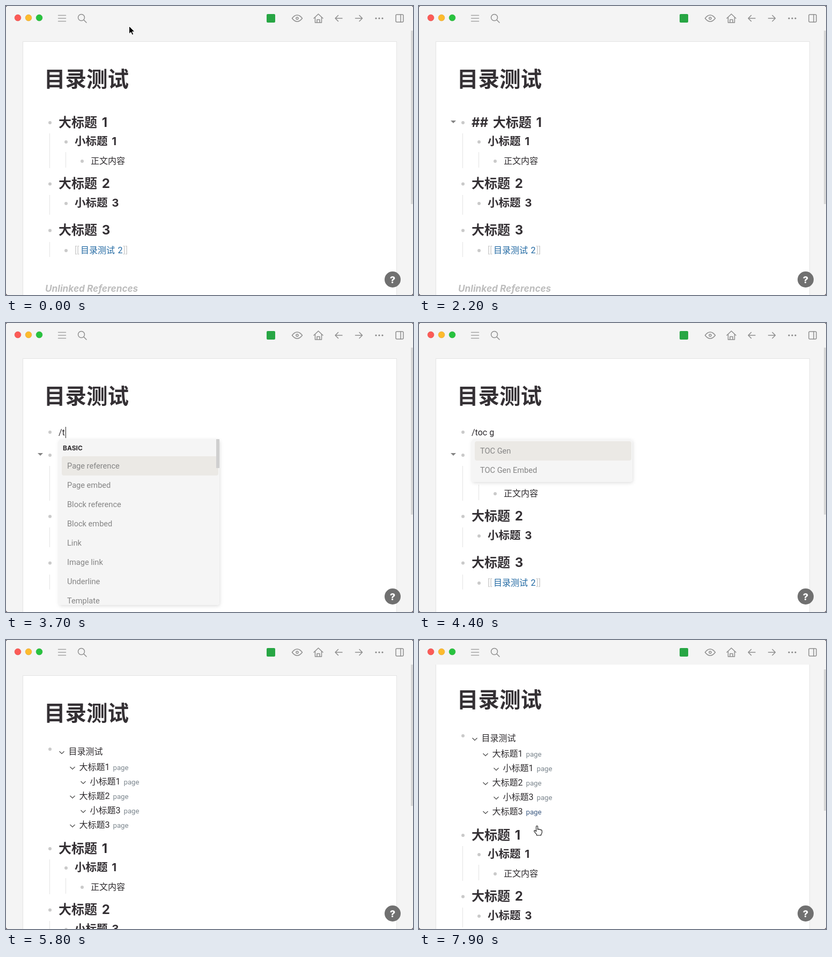
An HTML page that plays this animation: 759x540 px, repeating every 8000 ms.

```html
<!DOCTYPE html>
<html lang="zh-CN">
<head>
<meta charset="utf-8">
<title>目录测试</title>
<style>
  html, body { margin: 0; width: 100%; height: 100%; overflow: hidden; background: #4d3a40; }
  svg { display: block; width: 759px; height: 540px; }
  text { font: 16px Roboto, "Noto Sans CJK SC", "Noto Sans CJK", sans-serif; fill: #2d2a2d; white-space: pre; }
  .title, .h2, .h3 { font-family: Inter, "Noto Sans CJK SC", "Noto Sans CJK", sans-serif; font-weight: 700; fill: #343034; }
  .title { font-size: 39.5px; }
  .h2 { font-size: 24px; word-spacing: 3px; }
  .h3 { font-size: 20.5px; word-spacing: 3px; }
  .level { font: 11px "Noto Serif", serif; fill: #4c4c4c; }
  .refs { font: italic 700 17.2px Inter, sans-serif; fill: #bdbdbd; }
  .page { font-size: 13.2px; fill: #7c868e; }
  .page.on { fill: #3c5a82; }
  .item { font-size: 14.6px; fill: #858585; }
  .group { font: 700 12px Inter, sans-serif; }
  .bracket { fill: #cbcbcb; }
  .link { fill: #2068a2; word-spacing: 1.5px; }
  .icon { fill: none; stroke: #8f8f8f; stroke-width: 1.5; stroke-linecap: round; stroke-linejoin: round; }
</style>
</head>
<body>
<svg viewBox="0 0 759 540">
  <defs>
    <filter id="shadow" x="-10%" y="-10%" width="120%" height="125%">
      <feDropShadow dx="1" dy="2" stdDeviation="3" flood-opacity=".13"/>
    </filter>
  </defs>
  <rect width="759" height="540" rx="4" fill="#f4f4f4"/>
  <g id="scroller">
    <rect x="31.5" y="66.5" width="697" height="800" fill="#fff" stroke="#e4e4e4"/>
    <text class="title" x="71" y="150.5">目录测试</text>
    <g id="first">
      <circle cx="82" cy="204" r="3" fill="#cacaca"/>
      <text id="typed" x="98" y="210"></text>
      <g id="toc"></g>
    </g>
    <g id="outline"></g>
    <path id="caret" d="M0 194V215" stroke="#222"/>
    <g id="menu">
      <rect id="panel" x="98" y="217" width="300" rx="5" fill="#f5f5f5" filter="url(#shadow)"/>
      <g id="full"></g>
      <g id="filtered"></g>
    </g>
  </g>
  <path d="M0 46V4a4 4 0 0 1 4-4H755a4 4 0 0 1 4 4V46z" fill="#f4f4f4"/>
  <rect id="thumb" x="755" width="4" fill="#d7d7d7"/>
  <g stroke-width=".6">
    <circle cx="22" cy="22" r="5.9" fill="#fc5b57" stroke="#df4744"/>
    <circle cx="42" cy="22" r="5.9" fill="#fdbb2d" stroke="#dea035"/>
    <circle cx="62" cy="22" r="5.9" fill="#28c33f" stroke="#27a935"/>
  </g>
  <rect x="486" y="15" width="16" height="16" rx="2" fill="#27a644"/>
  <g class="icon">
    <path d="M97.500 17.500H111.500M97.500 23H111.500M97.500 28.500H111.500" stroke="#a3a3a3"/>
    <circle cx="140.500" cy="21.500" r="6"/><path d="M145 26L150 31"/>
    <path d="M533.500 23Q538 17 543 17T552.500 23Q548 29 543 29T533.500 23z"/><circle cx="543" cy="23" r="2"/>
    <path d="M574 23L582.500 15L591 23M576.500 21V31H588.500V21M580 31V25.500H585V31"/>
    <path d="M627 23H614M619.500 17.500L614 23L619.500 28.500M651.500 23H664.500M659 17.500L664.500 23L659 28.500"/>
    <rect x="727" y="16" width="14" height="14" rx="2"/><path d="M736 16V30"/>
  </g>
  <g fill="#858585"><circle cx="690" cy="23" r="1.600"/><circle cx="696" cy="23" r="1.600"/><circle cx="702" cy="23" r="1.600"/></g>
  <circle cx="721" cy="511" r="15" fill="#707070"/>
  <text x="721" y="517.500" text-anchor="middle" style="font:800 18px Inter,sans-serif;fill:#fff">?</text>
  <g id="cursor">
    <path id="arrow" d="M0 0V14.500L3.400 11.400L5.700 16.600L8.200 15.500L6 10.500H10.500z" fill="#000" stroke="#fff"/>
    <path id="beam" d="M-3-8Q0-8 0-6Q0-8 3-8M0-6V6M-3 8Q0 8 0 6Q0 8 3 8M-1.500 1H1.500" fill="none" stroke="#111" stroke-width="1.200"/>
    <path id="hand" d="M-1.500 1Q-1.500-.8 0-.8T1.500 1V6Q3 4.500 4.300 6.200Q6 5 7 7Q9 6.300 9.300 8.500V12Q9 14 7.500 15.500V17H-.5V15.500L-5 10Q-6 8-4 7.800L-1.500 9.500z" fill="#fff" stroke="#111" stroke-width="1.100"/>
  </g>
</svg>
<script>
const $ = id => document.getElementById(id);
const show = (el, on) => el.setAttribute('visibility', on ? 'inherit' : 'hidden');
const move = (el, x, y) => el.setAttribute('transform', `translate(${x} ${y})`);

// y, depth, class, text
const rows = [
  [217, 0, 'h2', '大标题 1'], [253, 1, 'h3', '小标题 1'], [289, 2, '', '正文内容'],
  [331.5, 0, 'h2', '大标题 2'], [368, 1, 'h3', '小标题 3'],
  [418.5, 0, 'h2', '大标题 3'], [456, 1, 'link', '目录测试 2']
];
const size = { h2: 24, h3: 20.5 };
const groups = [[200, 303], [315, 390], [402, 470]];
const guides = [[81.5, 238, 303], [111.5, 273, 302], [81.5, 353, 390], [81.5, 441, 469]];

$('outline').innerHTML =
  guides.map(([x, a, b]) => `<path d="M${x} ${a}V${b}" stroke="#e2e2e2"/>`).join('') +
  rows.map(([y, d, c, s]) => {
    const x = 98 + 30 * d, base = y + (size[c] || 16) * .36;
    const body = c === 'link'
      ? `<tspan class="bracket">[[</tspan><tspan class="link" dx="2.5">${s}</tspan><tspan class="bracket" dx="1">]]</tspan>`
      : `<tspan class="mark"></tspan>${s}`;
    const level = size[c] ? `<tspan class="level" dx="5" dy="-1">${c.toUpperCase()}</tspan>` : '';
    return `<circle cx="${82 + 30 * d}" cy="${y + 1}" r="3" fill="#cacaca"/>` +
      `<text class="${c}" x="${x}" y="${base}">${body}${level}</text>`;
  }).join('') +
  groups.map(([a]) => `<path class="fold" d="M59 ${a + 14}h10l-5 5z" fill="#848484"/>`).join('') +
  '<text class="refs" x="73" y="534">Unlinked References</text>';

// y, depth, text
const toc = [[208, 0, '目录测试'], [237, 1, '大标题1'], [264, 2, '小标题1'],
  [291, 1, '大标题2'], [318, 2, '小标题3'], [345, 1, '大标题3']];
$('toc').innerHTML = toc.map(([y, d, s]) =>
  `<path d="M${99.5 + 20 * d} ${y}l4.500 4.500l4.500-4.500" fill="none" stroke="#444" stroke-width="1.100"/>` +
  `<text x="${116.5 + 20 * d}" y="${y + 6}">${s}${d ? '<tspan class="page" dx="6">page</tspan>' : ''}</text>`
).join('');

const list = (items, top) =>
  `<rect x="104" y="${top}" width="292" height="36" rx="4" fill="#ebe9e5"/>` +
  items.map((s, i) => `<text class="item" x="114" y="${top + 23 + 36 * i}">${s}</text>`).join('');
$('full').innerHTML = '<text class="group" x="106" y="238">BASIC</text>' +
  list(['Page reference', 'Page embed', 'Block reference', 'Block embed', 'Link', 'Image link', 'Underline', 'Template'], 249) +
  '<rect x="392" y="217" width="6" height="54" fill="#cfcfcf"/>';
$('filtered').innerHTML = list(['TOC Gen', 'TOC Gen Embed'], 221);

const levels = [...document.querySelectorAll('.level')];
const folds = [...document.querySelectorAll('.fold')];
const pages = [...document.querySelectorAll('.page')];
const mark = document.querySelector('.mark');
const headed = rows.filter(r => size[r[2]]);

// time, x, y
const path = [[0, 229.5, 37.5], [200, 300, 70], [400, 570, 230], [600, 420, 410], [700, 260, 448],
  [900, 112, 312], [1000, 101, 258], [1100, 98, 217], [1200, 98, 217], [1500, 260, 222],
  [1800, 408, 250], [2000, 404, 250], [2100, 400, 234], [6200, 400, 234], [6600, 270, 262],
  [7000, 212, 320], [7300, 224, 334], [7600, 220, 348], [8000, 220, 348]];

// time, typed text
const typing = [[0, ''], [3300, '/'], [3700, '/t'], [3900, '/to'], [4000, '/toc'], [4100, '/toc g'],
  [4600, '{{renderer :tocgen2}}'], [5400, '']];
// time, caret opacity
const blink = [[0, 0], [1300, 1], [1800, 0], [2400, 1], [3000, .08], [3300, 1], [4400, 0], [4600, 1], [5200, 0]];
// time, outline shift, thumb height
const layout = [[0, 0, 324], [2400, 29, 312], [5700, 172, 264]];

const at = (table, t) => table.filter(k => k[0] <= t).pop();

function pointer(t) {
  const i = Math.max(1, path.findIndex(k => k[0] > t));
  const [t0, x0, y0] = path[i - 1], [t1, x1, y1] = path[i];
  const p = (t - t0) / (t1 - t0);
  return [x0 + (x1 - x0) * p, y0 + (y1 - y0) * p];
}

function draw(now) {
  const t = Math.floor(now % 8000 / 100) * 100;
  const [, shift, thumb] = at(layout, t);
  const scroll = t < 7800 ? 0 : t < 7900 ? 12 : 25;
  const [x, y] = pointer(t);
  const rendered = t >= 5700, editing = t >= 1300 && t < 2700;

  move($('scroller'), 0, -scroll);
  move($('outline'), 0, shift);
  show($('first'), shift);
  show($('toc'), rendered);
  $('thumb').setAttribute('y', 46 + scroll * .36);
  $('thumb').setAttribute('height', thumb);

  $('typed').textContent = at(typing, t)[1];
  const inHeading = t < 2700;
  move($('caret'), 99.5 + $('typed').getComputedTextLength(), inHeading ? 13 + shift : 0);
  $('caret').setAttribute('opacity', at(blink, t)[1]);
  mark.textContent = editing ? '## ' : '';

  const open = t >= 3300 && t < 4600, full = t < 3900;
  show($('menu'), open);
  show($('full'), open && full);
  show($('filtered'), open && !full);
  $('panel').setAttribute('height', full ? 310 : 80);

  const hoverY = y - shift;
  const hovering = !rendered && y > 190;
  levels.forEach((el, i) => {
    const over = hovering && Math.abs(hoverY - headed[i][0]) < 18;
    el.style.display = over && !(editing && i === 0) ? '' : 'none';
  });
  folds.forEach((el, i) => show(el, hovering && hoverY >= groups[i][0] && hoverY <= groups[i][1]));

  // The link stays lit while the page scrolls under a resting pointer.
  let onLink = false;
  pages.forEach((el, i) => {
    const [py, d] = toc[i + 1], left = 176 + 20 * d;
    const on = rendered && t > 6200 && Math.abs(y - py) < 11 && x > left && x < left + 56;
    el.classList.toggle('on', on);
    onLink = onLink || on;
  });
  const kind = onLink ? 'hand' : y > 190 && x < 728 ? 'beam' : 'arrow';
  const visible = t < 2100 || t > 6200;
  for (const k of ['arrow', 'beam', 'hand']) show($(k), visible && k === kind);
  move($('cursor'), x, y);
}

const start = performance.now();
function tick() {
  draw(performance.now() - start);
  requestAnimationFrame(tick);
}
draw(0);
tick();
</script>
</body>
</html>
```
